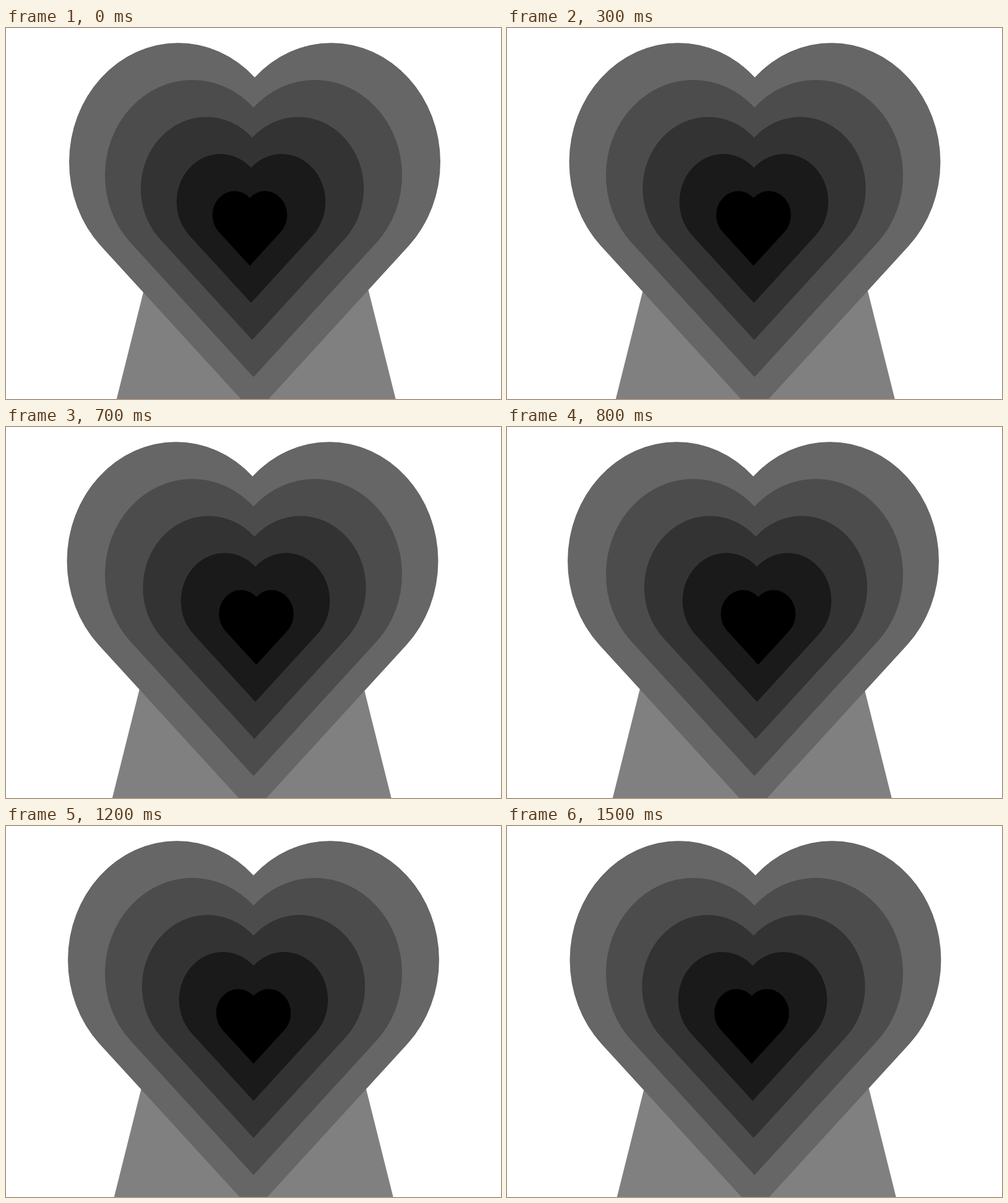
An HTML page that plays this animation: 800x600 px, repeating every 1600 ms.

```html
<!DOCTYPE html>
<html lang="en">
<head>
<meta charset="utf-8">
<title>Hearts</title>
<style>
  @property --sway {
    syntax: "<number>";
    inherits: true;
    initial-value: -1;
  }
  html, body {
    margin: 0;
    width: 100%;
    height: 100%;
    overflow: hidden;
    background: #fff;
  }
  svg {
    display: block;
    width: 800px;
    height: 600px;
    shape-rendering: crispEdges;
    animation: sway 1600ms infinite steps(8);
  }
  /* Each layer slides by its own depth, all driven by one value */
  .layer {
    transform: translateX(calc(var(--sway) * var(--depth))) scale(var(--size, 1));
  }
  /* The thin outline fills pixels that are only partly covered */
  path {
    fill: currentColor;
    stroke: currentColor;
    stroke-width: .98px;
    stroke-linejoin: round;
    vector-effect: non-scaling-stroke;
  }
  @keyframes sway {
    0%, 100% { --sway: -1; }
    50% { --sway: 1; }
  }
</style>
</head>
<body>
<svg viewBox="-400 -324 800 600">
  <defs>
    <path id="heart" d="M0 300 L-248.53 28.16 A175.74 192.22 0 0 1 0 -243.68 A175.74 192.22 0 0 1 248.53 28.16 Z"/>
  </defs>
  <path class="layer" style="--depth: -4px" color="#808080" d="M-174.75 76 H175.25 L225.25 276 H-224.75 Z"/>
  <use class="layer" href="#heart" style="--depth: -2px; --size: 1" color="#666"/>
  <use class="layer" href="#heart" style="--depth: 0px; --size: .8" color="#4c4c4c"/>
  <use class="layer" href="#heart" style="--depth: 2px; --size: .6" color="#333"/>
  <use class="layer" href="#heart" style="--depth: 4px; --size: .4" color="#1a1a1a"/>
  <use class="layer" href="#heart" style="--depth: 6px; --size: .2" color="#000"/>
</svg>
</body>
</html>
```
